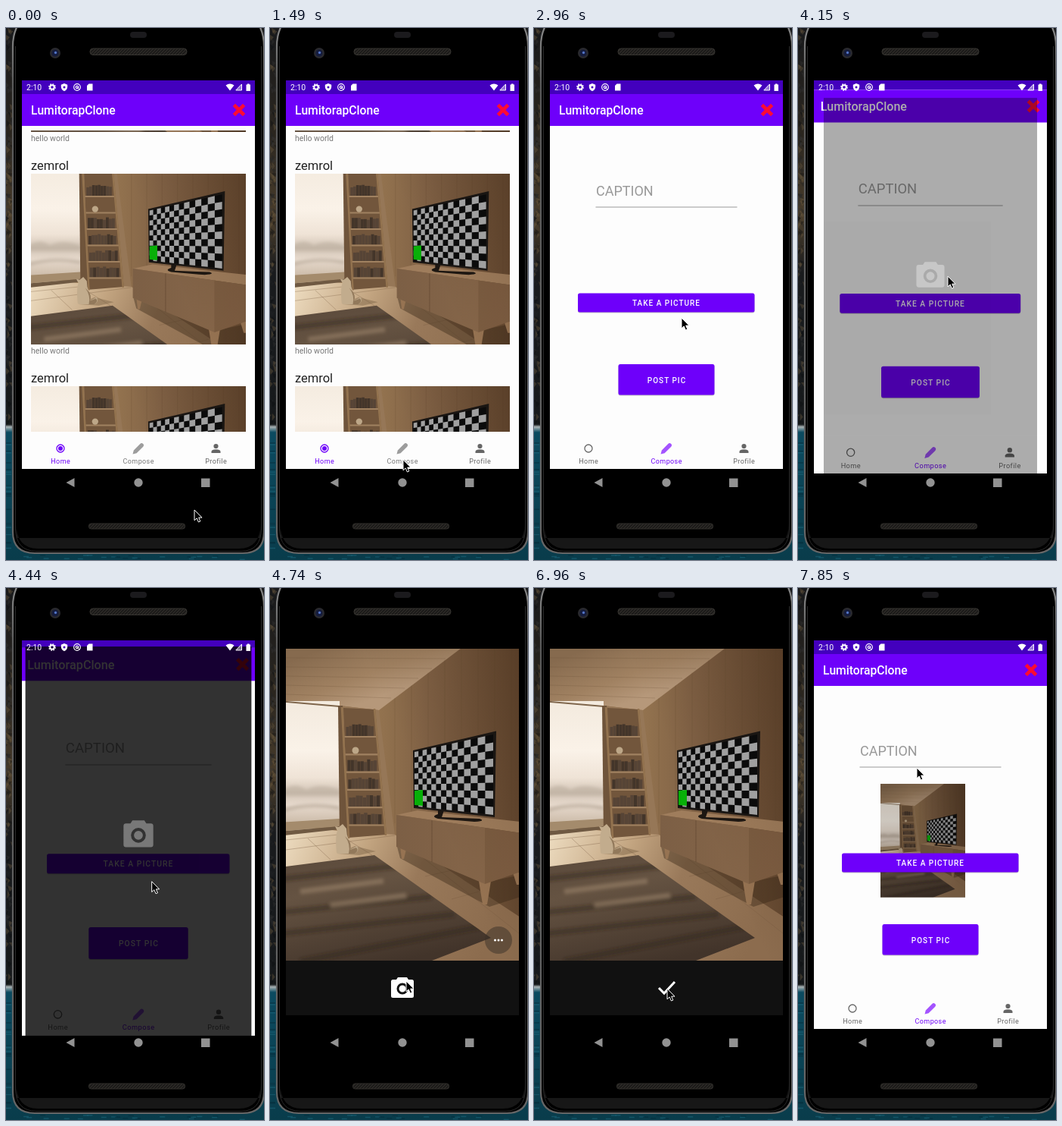
Recreate the animation shown at these times as an HTML page. Size 341 by 701 pixels, loop 8000 ms.

```html
<!DOCTYPE html>
<html lang="en">
<head>
<meta charset="utf-8">
<title>Phone camera demo</title>
<style>
html, body { margin: 0; width: 100%; height: 100%; overflow: hidden; background: #000; }
svg { display: block; width: 100vw; height: 100vh; }
text { font-family: Roboto, "Noto Sans", sans-serif; }
.label { font-size: 10px; font-weight: 500; letter-spacing: 1px; fill: #fff; text-anchor: middle; }
.tab { font-size: 9px; letter-spacing: .4px; text-anchor: middle; }
</style>
</head>
<body>
<svg viewBox="0 0 341 701" preserveAspectRatio="none">
<defs>
  <linearGradient id="desk" x1="0" y1="0" x2="0" y2="1">
    <stop offset="0" stop-color="#18191b"/><stop offset=".2" stop-color="#2b261f"/>
    <stop offset=".36" stop-color="#4a3d2b"/><stop offset=".46" stop-color="#191b1d"/>
    <stop offset=".745" stop-color="#16191b"/><stop offset=".75" stop-color="#aab4b6"/>
    <stop offset=".76" stop-color="#0b4a60"/><stop offset="1" stop-color="#093c4b"/>
  </linearGradient>
  <linearGradient id="rim" x1="0" y1="0" x2="0" y2="1">
    <stop offset="0" stop-color="#8c8c8c"/><stop offset=".12" stop-color="#5a5a5a"/><stop offset="1" stop-color="#666"/>
  </linearGradient>
  <linearGradient id="ceiling" gradientUnits="userSpaceOnUse" x1="70" y1="80" x2="100" y2="160">
    <stop offset="0" stop-color="#866a4e"/><stop offset=".6" stop-color="#a08161"/><stop offset="1" stop-color="#b6987a"/>
  </linearGradient>
  <linearGradient id="wall" gradientUnits="userSpaceOnUse" x1="144" y1="0" x2="329" y2="0">
    <stop offset="0" stop-color="#93734f"/><stop offset=".35" stop-color="#806145"/><stop offset="1" stop-color="#644830"/>
  </linearGradient>
  <linearGradient id="glass" x1="0" y1="0" x2="0" y2="1">
    <stop offset="0" stop-color="#f3eade"/><stop offset=".4" stop-color="#faf2e8"/><stop offset=".62" stop-color="#efe3d6"/>
    <stop offset=".74" stop-color="#d2c4b6"/><stop offset=".84" stop-color="#e7dacd"/><stop offset="1" stop-color="#c9b8a5"/>
  </linearGradient>
  <linearGradient id="floor" gradientUnits="userSpaceOnUse" x1="21" y1="320" x2="300" y2="440">
    <stop offset="0" stop-color="#eddcc0"/><stop offset=".35" stop-color="#c2a480"/><stop offset=".6" stop-color="#99795a"/><stop offset="1" stop-color="#8c6c4e"/>
  </linearGradient>
  <linearGradient id="rug" x1="0" y1="0" x2=".4" y2="1">
    <stop offset="0" stop-color="#59483a"/><stop offset=".35" stop-color="#655342"/><stop offset="1" stop-color="#42342a"/>
  </linearGradient>
  <linearGradient id="front" x1="0" y1="0" x2="1" y2="0">
    <stop offset="0" stop-color="#7c5f45"/><stop offset="1" stop-color="#8a694b"/>
  </linearGradient>
  <linearGradient id="shade" x1="0" y1=".6" x2="1" y2="0">
    <stop offset=".5" stop-color="#2a1708" stop-opacity="0"/><stop offset="1" stop-color="#2a1708" stop-opacity=".22"/>
  </linearGradient>
  <filter id="soft" x="0" y="0" width="1" height="1"><feGaussianBlur stdDeviation=".6"/></filter>
  <filter id="haze" x="-.2" y="-.5" width="1.4" height="2"><feGaussianBlur stdDeviation="2.2"/></filter>
  <pattern id="mesh" width="4" height="4" patternUnits="userSpaceOnUse">
    <rect width="4" height="4" fill="#292724"/><path d="M0 4L4 0" stroke="#111"/>
  </pattern>
  <clipPath id="screen"><rect x="21" y="69" width="308" height="548"/></clipPath>
  <clipPath id="photoBox"><rect x="21" y="80" width="308" height="411"/></clipPath>
  <clipPath id="postBox"><rect x="33" y="192" width="284" height="225"/></clipPath>
  <clipPath id="list"><rect x="21" y="135" width="308" height="397"/></clipPath>
  <clipPath id="rugBox"><path d="M21 367L138 352L292 461L214 491H21Z"/></clipPath>

  <g id="photo" clip-path="url(#photoBox)">
    <rect x="21" y="80" width="308" height="411" fill="url(#wall)"/>
    <g filter="url(#soft)">
      <rect x="10" y="70" width="330" height="432" fill="url(#wall)"/>
      <path d="M10 70H265L144 161L92 155L10 148Z" fill="url(#ceiling)"/>
      <path d="M92 155L144 161L165 326L92 330Z" fill="#967757"/>
      <g id="boards" stroke="#5f452f" stroke-opacity=".2" fill="none"></g>
      <path d="M10 312L92 320L165 325L340 440V502H10Z" fill="url(#floor)"/>
      <path d="M21 345L165 326M21 332L120 322M50 330L80 358M90 324L135 352M180 338L329 455M205 380L240 372M240 410L276 400" stroke="#765a3f" stroke-opacity=".35" fill="none"/>
      <rect x="10" y="149" width="82" height="163" fill="url(#glass)"/>
      <g filter="url(#haze)">
        <path d="M15 268Q32 254 48 266Q66 256 92 266V274H15Z" fill="#b9ab9c" opacity=".55"/>
        <path d="M15 294Q50 282 92 290" stroke="#a79887" stroke-opacity=".6" stroke-width="4" fill="none"/>
      </g>
      <path d="M10 309L92 304V314L10 321Z" fill="#a48b6c"/>
      <path d="M10 321L92 314V318L10 327Z" fill="#6f5942"/>
      <path d="M10 148L92 155V157L10 150Z" fill="#7f664c"/>
      <path d="M90 155H96L104 328H92Z" fill="#6f543b"/>
      <path d="M97 158L139 160L154 325L104 329Z" fill="#72563c"/>
      <g id="shelf"></g>
      <path d="M95 157L104 330M138 159L153 326" stroke="#93734f" stroke-width="2.600" fill="none"/>
      <circle cx="113" cy="214" r="4.500" fill="#bda788"/>
      <path d="M10 368.500L138 352L292 461L214 491L200 502H10Z" fill="url(#rug)"/>
      <g clip-path="url(#rugBox)"><g filter="url(#haze)" fill="none" stroke-width="7">
        <path d="M10 384L170 366M10 428L214 407M10 456L244 430M40 492L280 446" stroke="#2e231b" stroke-opacity=".45"/>
        <path d="M40 400L150 386M80 418L180 405" stroke="#a48b70" stroke-opacity=".5"/>
      </g></g>
      <path d="M89 350L118 352L140 347L112 340Z" fill="#6f573e" opacity=".4"/>
      <path d="M88 349Q86 327 89 320L86 314L91 315L96 311L101 317Q101 325 104 332Q108 339 106 345L115 340Q119 346 112 350H90Z" fill="#c2ac8d"/>
      <path d="M99 327Q107 338 104 350H112Q118 346 114 342L106 345Q108 338 104 332Z" fill="#92795b"/>
      <path d="M168 341L284 388L340 376V404L290 420L172 356Z" fill="#382717" opacity=".42"/>
      <path d="M172 340H181L177 357H174ZM276 386H292L287 417H281ZM321 375H340V391H326Z" fill="#967352"/>
      <path d="M167 299L195 293L340 309V324Z" fill="#9f7d5c"/>
      <path d="M167 299L340 324V371L284 390L167 341Z" fill="url(#front)"/>
      <path d="M284 316L340 324V371L284 390Z" fill="#4d3520" opacity=".18"/>
      <path d="M214 306V361" stroke="#543d2a" stroke-opacity=".5" fill="none"/>
      <path d="M222 292L230 293L227 302L277 304Q286 307 270 308L222 304Q212 301 222 298Z" fill="#1d1712"/>
      <rect x="10" y="70" width="330" height="432" fill="url(#shade)"/>
    </g>
    <path d="M189 214L299 188.500L297 302L190 290Z" fill="#1a1613"/>
    <g id="checks"></g>
    <path d="M191 267L202 266V287L191 286Z" fill="#08af08"/>
  </g>

  <g id="post">
    <text x="33" y="187" font-size="16.500" fill="#222">zemrol</text>
    <g clip-path="url(#postBox)"><use href="#photo" transform="translate(13.640 41.300) scale(.922)"/></g>
    <text x="33" y="428.500" font-size="10.500" fill="#777">hello world</text>
  </g>

  <path id="shutter" fill-rule="evenodd" d="M-12.500 -10.500H-8L-6 -13.500H6L8 -10.500H12.500Q15 -10.500 15 -8V11Q15 13.500 12.500 13.500H-12.500Q-15 13.500 -15 11V-8Q-15 -10.500 -12.500 -10.500ZM0 -6A7.500 7.500 0 1 0 0 9A7.500 7.500 0 1 0 0 -6ZM0 -3A4.500 4.500 0 1 1 0 6A4.500 4.500 0 1 1 0 -3Z"/>
</defs>

<rect width="341" height="701" fill="url(#desk)"/>
<g id="rocks"></g>
<path d="M9 24Q9 6 18 -8H332Q341 6 341 24V664Q341 692 313 692H38Q9 692 9 664Z" fill="#000" stroke="url(#rim)" stroke-width="2.200"/>
<path d="M13 652Q14 686 42 686H308Q336 686 337 652L336 672H14Z" fill="#171717"/>
<path d="M12.500 24V660Q13 689 40 689.500H311Q337 689 337.500 660V24" fill="none" stroke="#2a2a2a"/>
<rect x="164" y="5" width="22" height="8" rx="4" fill="#1b1a1d"/>
<circle cx="65" cy="33" r="7" fill="#2a2a2e"/><circle cx="65" cy="33" r="4.500" fill="#151c3d"/><circle cx="65.500" cy="32.500" r="1.700" fill="#5273c4"/>
<rect x="111" y="27" width="128" height="8.500" rx="4" fill="url(#mesh)" stroke="#373531"/>
<rect x="109.500" y="653" width="127" height="7" rx="3" fill="url(#mesh)" stroke="#302e2b"/>

<g clip-path="url(#screen)">
  <g id="app">
    <rect x="21" y="69" width="308" height="512" fill="#fdfdfd"/>
    <g id="feed" clip-path="url(#list)">
      <use href="#post" y="-280"/><use href="#post"/><use href="#post" y="280"/>
    </g>
    <g id="compose">
      <text x="82" y="220.500" font-size="18" fill="#999">CAPTION</text>
      <path d="M81.500 236H268.500" stroke="#999"/>
      <g id="thumb"><use href="#photo" transform="translate(101.360 229) scale(.3637)"/><rect x="109" y="258" width="112" height="150" fill="#000" opacity=".18"/></g>
      <rect x="58" y="350.500" width="233.500" height="25" rx="2.500" fill="#000" opacity=".22"/>
      <rect id="take" x="58" y="349.500" width="233.500" height="25" rx="2.500"/>
      <text class="label" x="175" y="366">TAKE A PICTURE</text>
      <rect x="111.500" y="444" width="127" height="40.500" rx="2.500" fill="#000" opacity=".22"/>
      <rect x="111.500" y="443" width="127" height="40.500" rx="2.500" fill="#6e00fa"/>
      <text class="label" x="175.500" y="467.500">POST PIC</text>
    </g>
    <rect x="21" y="532" width="308" height="49" fill="#fdfdfd"/>
    <circle id="ripple" cx="175" cy="560" fill="#6e00fa" opacity=".1"/>
    <g id="homeTab">
      <circle cx="72" cy="554" r="5" fill="none" stroke="currentColor" stroke-width="1.300"/>
      <circle id="dot" cx="72" cy="554" r="3" fill="currentColor"/>
      <text class="tab" x="72.200" y="573.800" fill="currentColor">Home</text>
    </g>
    <g id="composeTab">
      <path id="pencil" d="M167.500 561.500L168.800 556.500L177 548.200Q179 546 181 547.700Q183.200 549.500 181 552L172.600 560.200Z"/>
      <text class="tab" x="175.200" y="573.800" fill="currentColor">Compose</text>
    </g>
    <g fill="#666">
      <circle cx="277.500" cy="551" r="3.100"/><path d="M271.500 560V558Q272 555.500 277.500 555.300Q283 555.500 283.500 558V560Z"/>
      <text class="tab" x="277.700" y="573.800">Profile</text>
    </g>
    <rect x="21" y="69" width="308" height="18" fill="#4300bd"/>
    <rect x="21" y="87" width="308" height="42" fill="#6e00fa"/>
    <text x="33" y="114" font-size="15.700" font-weight="500" fill="#fff">LumitorapClone</text>
    <path d="M303 103L313 113M313 103L303 113" stroke="#ff0b32" stroke-width="4.600" stroke-linecap="square"/>
  </g>
  <g id="camera">
    <rect x="21" y="69" width="308" height="548" fill="#000"/>
    <g id="splash"><use href="#shutter" transform="translate(175 323.300) scale(1.350)" fill="#585858"/></g>
    <g id="live">
      <use href="#photo"/>
      <rect id="bar" x="21" y="491" width="308" height="72" fill="#111"/>
      <use id="snap" href="#shutter" transform="translate(175 526.500)"/>
      <path id="done" d="M165 527L172 534L186 519" fill="none" stroke="#fff" stroke-width="3"/>
      <g id="more"><circle cx="302" cy="464" r="18" fill="#3a3029" opacity=".5"/><g fill="#fff"><circle cx="297.500" cy="464" r="1.500"/><circle cx="302" cy="464" r="1.500"/><circle cx="306.500" cy="464" r="1.500"/></g></g>
    </g>
  </g>
</g>

<g id="status" fill="#fff">
  <text x="27" y="82" font-size="10.500">2:10</text>
  <circle cx="61" cy="78" r="2.800" fill="none" stroke="#fff" stroke-width="2"/>
  <circle cx="61" cy="78" r="4.200" fill="none" stroke="#fff" stroke-width="1.400" stroke-dasharray="1.700 1.600"/>
  <path d="M77 73L81.200 74.700V77.500Q81 81.500 77 83.200Q73 81.500 72.800 77.500V74.700Z"/><circle cx="77" cy="78" r="1.500" fill="#4300bd"/>
  <circle cx="94" cy="78" r="4.300" fill="none" stroke="#fff" stroke-width="1.200"/><circle cx="94" cy="78" r="1.700" fill="none" stroke="#fff" stroke-width="1.200"/><path d="M94 78L97 81" stroke="#fff"/>
  <path d="M109.500 73.500H114.500V82.500H107V76Z"/>
  <path d="M290.500 75.500Q296 71.500 301.500 75.500L296 82.500ZM317.500 74.500H319V73.500H321.500V74.500H323V83H317.500Z"/>
  <path d="M311.500 74V82H303.800ZM308 78V82H304Z" fill-opacity=".45"/><path d="M311.500 74V82H303.800Z" fill="none" stroke="#fff"/>
</g>
<g fill="#929292"><path d="M79.500 599L90.500 593V605Z"/><circle cx="175" cy="599" r="5.700"/><rect x="258" y="593.500" width="11.500" height="11.500"/></g>
<path id="cursor" d="M0 0V13.800L3.200 10.900L5.400 16L7.800 15L5.700 10.100H10Z" fill="#000" stroke="#fff" stroke-width="1"/>
</svg>
<script>
const LOOP = 8000;
const $ = id => document.getElementById(id);
const set = (id, attrs) => { for (const k in attrs) $(id).setAttribute(k, attrs[k]); };
const show = (id, on) => { $(id).style.display = on ? "" : "none"; };
const noise = n => { const v = Math.sin(n * 127.1) * 43758.5453; return v - Math.floor(v); };
const mix = (a, b, k) => a + (b - a) * k;

// Bursts of change: start, end, number of steps
const BURSTS = [[300, 1040, 6], [1490, 2520, 8], [2670, 3250, 5], [3550, 4590, 8],
  [4740, 5040, 3], [5640, 6220, 5], [6520, 6960, 4], [7410, 7850, 4]];

// Pointer path: time, x, y
const POINTER = [[0, 249, 635], [300, 247, 632], [448, 236, 621], [744, 190, 580], [892, 169, 570],
  [1040, 176, 569], [1784, 176, 569], [2080, 180, 530], [2520, 187, 426], [2670, 188, 417],
  [2960, 195, 382], [3250, 196, 364], [3550, 196, 364], [4144, 198, 327], [4590, 182, 506],
  [4740, 180, 518], [4890, 181, 533], [5040, 181, 527], [6520, 181, 527], [6740, 178, 562],
  [6960, 176, 528], [7410, 176, 528], [7850, 157, 237]];

// Camera window: time, opacity, scale
const WINDOW = [[3847, 0, .85], [3996, .1, .87], [4144, .32, .9156], [4293, .8, .97], [4441, 1, 1],
  [7410, 1, 1], [7557, .5, .95], [7703, 0, .9]];

// Scale of the app behind it
const BEHIND = [[3847, 1], [4144, 1.023], [4441, 1.045], [7410, 1.045], [7557, 1.02], [7703, 1]];

function stepTime(t) {
  let out = 0;
  for (const [a, b, n] of BURSTS) {
    if (t < a) break;
    const gap = (b - a) / (n - 1);
    out = a + gap * Math.min(n - 1, Math.floor((t - a) / gap + 1e-6));
  }
  return out;
}

function along(keys, t) {
  let i = 0;
  while (i < keys.length - 1 && keys[i + 1][0] <= t) i++;
  const a = keys[i], b = keys[i + 1] || a;
  const k = b === a ? 0 : Math.max(0, (t - a[0]) / (b[0] - a[0]));
  return a.slice(1).map((v, j) => mix(v, b[j + 1], k));
}

const zoom = (cy, s) => `translate(175 ${cy}) scale(${s}) translate(-175 ${-cy})`;

function drawDesktop() {
  let out = "";
  for (let i = 0; i < 150; i++) {
    const y = noise(i) * 522, tone = ["#0b0c0e", "#343534", "#6c5a3f", "#202326"][Math.floor(noise(i + 300) * 4)];
    out += `<path d="M${noise(i + 500) * 9 - 3} ${y}l${3 + noise(i + 700) * 5} ${noise(i + 90) * 6}l-4 5z" fill="${tone}" opacity=".4"/>`;
  }
  for (let i = 0; i < 50; i++) {
    const low = i % 2, x = low ? noise(i) * 330 : 0, y = low ? 694 + noise(i + 9) * 6 : 535 + noise(i + 9) * 160;
    out += `<rect x="${x}" y="${y}" width="7" height="1.5" fill="${noise(i + 40) > .5 ? "#1b6579" : "#052d3c"}" opacity=".6"/>`;
  }
  $("rocks").innerHTML = out;
}

function drawBoards() {
  let out = "";
  for (let x = 165; x < 329; x += 22) out += `<path d="M${x} ${161 - (x - 144) * .76}V310"/>`;
  for (let i = 1; i < 6; i++) out += `<path d="M21 ${80 + i * 12}L${250 - i * 18} ${80 + i * 13}"/>`;
  $("boards").innerHTML = out;
}

function drawShelf() {
  let out = "";
  for (let r = 0; r < 6; r++) {
    const y = 195 + r * 23.3, k = (y - 160) / 166, l = mix(97, 104, k), w = mix(41, 49, k);
    if (r !== 1) for (let i = 0; i < 9; i++) {
      const h = 12 + noise(r * 9 + i) * 4;
      out += `<rect x="${l + 2 + i * (w - 6) / 9}" y="${y - h}" width="${(w - 8) / 9}" height="${h}" fill="${noise(i + r * 31) > .5 ? "#43352a" : "#564436"}"/>`;
    }
    out += `<path d="M${l} ${y + 1}h${w}" stroke="#a08160" stroke-width="2.2"/>`;
  }
  $("shelf").innerHTML = out;
}

// Checkerboard in perspective: the right edge is nearer
function drawChecks() {
  const cols = 14, rows = 10, depth = 106 / 72;
  const at = (c, r) => {
    const s = c / cols, u = s / mix(depth, 1, s), v = r / rows;
    return `${mix(191, 295, u).toFixed(1)} ${mix(mix(216, 193, u), mix(287.5, 299, u), v).toFixed(1)}`;
  };
  let d = "";
  for (let c = 0; c < cols; c++) for (let r = c % 2; r < rows; r += 2)
    d += `M${at(c, r)}L${at(c + 1, r)}L${at(c + 1, r + 1)}L${at(c, r + 1)}Z`;
  $("checks").innerHTML = `<path d="M${at(0, 0)}L${at(cols, 0)}L${at(cols, rows)}L${at(0, rows)}Z" fill="#0b0b0b"/><path d="${d}" fill="#a0a0a0"/>`;
}

function draw(time) {
  const t = stepTime(time);
  const composing = t > 1780, picked = t > 1630;
  const [x, y] = along(POINTER, t);
  const [alpha, size] = along(WINDOW, t);
  set("cursor", { transform: `translate(${x} ${y})` });

  show("feed", !composing);
  show("compose", composing);
  show("thumb", t > 7500);
  show("dot", !picked);
  set("homeTab", { color: picked ? "#666" : "#6e00fa" });
  set("composeTab", { color: picked ? "#6e00fa" : "#777" });
  set("pencil", { fill: picked ? "#a454ff" : "#9d9d9d" });
  show("ripple", t > 1630 && t < 2070);
  set("ripple", { r: Math.max(0, Math.min(21, 12 + (t - 1630) * .04)) });
  set("take", { fill: t > 3540 && t < 3990 ? "#842bfb" : "#6e00fa" });

  const [back] = along(BEHIND, t);
  set("app", { transform: zoom(325, back) });
  show("camera", alpha > 0);
  set("camera", { opacity: alpha, transform: zoom(343, size) });
  show("status", alpha < .9);
  show("splash", t < 4580);
  show("live", t > 4580);

  const pressed = t > 5630, review = t > 6510;
  show("snap", !review);
  show("more", !review);
  show("done", review);
  set("snap", { fill: pressed ? "#454545" : "#fff" });
  set("bar", { fill: pressed && t < 6000 ? "#191919" : "#111" });
}

drawDesktop();
drawBoards();
drawShelf();
drawChecks();
const began = performance.now();
function tick() {
  draw((performance.now() - began) % LOOP);
  requestAnimationFrame(tick);
}
draw(0);
requestAnimationFrame(tick);
</script>
</body>
</html>
```
